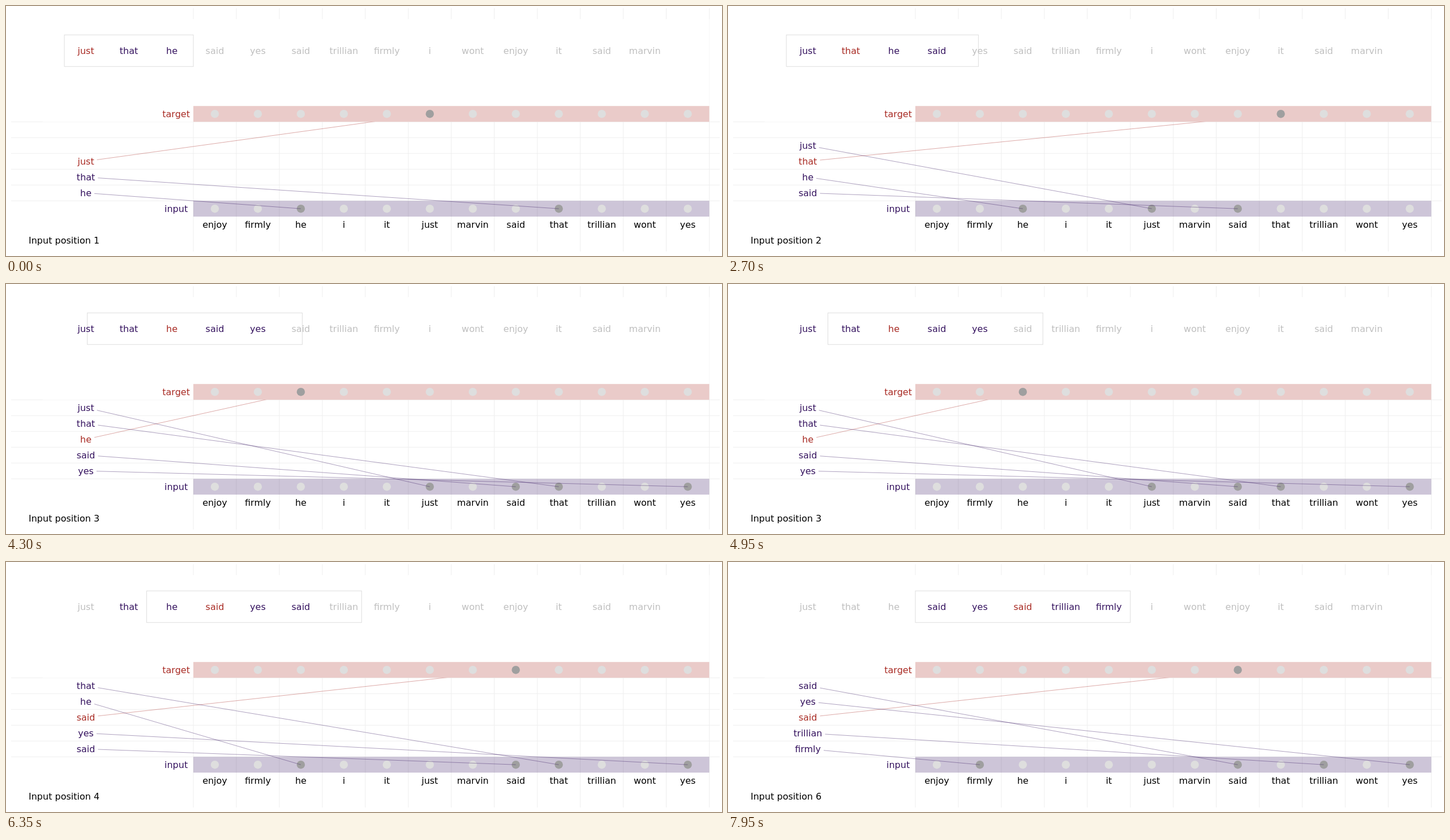
These frames come from a looping animation (1265 by 443 pixels, 8000 ms). An HTML page with a canvas:

```html
<!DOCTYPE html>
<html lang="en">
<head>
<meta charset="utf-8">
<title>Sliding context window</title>
<style>
  html, body { margin: 0; width: 100%; height: 100%; overflow: hidden; background: #fff; }
  canvas { display: block; }
</style>
</head>
<body>
<canvas id="stage" width="1265" height="443"></canvas>
<script>
const ctx = document.getElementById('stage').getContext('2d');
const LOOP = 8000, STEP = 1500, TICK = 50;
const STARTS = [500, 2000, 3500, 4980, 6450, 7950];

const words = 'just that he said yes said trillian firmly i wont enjoy it said marvin'.split(' ');
const vocab = [...new Set(words)].sort();

const RED = '#a82a23', PURPLE = '#34125e', GREY = '#bfbfbf', GRID = '#eee';
const DOTS = ['#dedede', '#9f9f9f', '#000'];

const COL = 75.96, ROW = 28, X0 = 331, Y0 = 51.2;
const LABEL_X = X0 - 2.5 * COL;
const RIGHT = X0 + vocab.length * COL;
const colX = i => X0 + (i + 0.5) * COL;
const wordX = i => LABEL_X + i * COL;
const midY = r => Y0 + r * ROW;
const bottomY = r => midY(r + 0.5);
const TARGET = 5, CENTRE = 8, INPUT = 11;

function text(str, x, y, color, align = 'center') {
  ctx.fillStyle = color;
  ctx.textAlign = align;
  ctx.fillText(str, x, y + 5.6);
}

function line(x1, y1, x2, y2, color, alpha = 1) {
  ctx.globalAlpha = alpha;
  ctx.strokeStyle = color;
  ctx.beginPath();
  ctx.moveTo(x1, y1);
  ctx.lineTo(x2, y2);
  ctx.stroke();
  ctx.globalAlpha = 1;
}

function band(row, color) {
  ctx.globalAlpha = 0.245;
  ctx.fillStyle = color;
  ctx.fillRect(X0, bottomY(row - 1), RIGHT - X0, ROW);
  ctx.globalAlpha = 1;
}

function dots(row, active) {
  vocab.forEach((word, i) => {
    ctx.fillStyle = DOTS[active.filter(w => w === word).length];
    ctx.beginPath();
    ctx.arc(colX(i), midY(row), 7.2, 0, 2 * Math.PI);
    ctx.fill();
  });
}

// Connects a label to its vocabulary column, leaving room for the label text.
function link(word, row, endRow, color) {
  const y = midY(row), endX = colX(vocab.indexOf(word)), endY = midY(endRow);
  const gap = ctx.measureText(word).width / 2 + 5;
  const startY = y + (endY - y) * gap / (endX - LABEL_X);
  line(LABEL_X + gap, startY, endX, endY, color, 0.4);
}

function grid() {
  for (let i = 0; i <= vocab.length; i++) line(X0 + i * COL, 4, X0 + i * COL, 435, GRID);
  for (let r = TARGET; r < INPUT; r++) line(9, bottomY(r), 1261, bottomY(r), GRID);
}

// Fractional window position: the whole part is the current input position.
function progress(t) {
  if (t < STARTS[0]) return 1;
  const k = STARTS.filter(s => s <= t).length;
  return k + Math.min((t - STARTS[k - 1]) / STEP, 0.999);
}

function draw(t) {
  const p = progress(t), position = Math.floor(p), target = position - 1;
  const inWindow = i => Math.abs(i - target) <= 2;
  const color = i => i === target ? RED : inWindow(i) ? PURPLE : GREY;
  const shown = words.map((word, i) => ({ word, i, row: CENTRE + i - target }))
                     .filter(d => inWindow(d.i));
  const inputs = shown.filter(d => d.i !== target);

  ctx.fillStyle = '#fff';
  ctx.fillRect(0, 0, 1265, 443);
  ctx.font = '16px "DejaVu Sans", sans-serif';
  ctx.lineWidth = 1;

  grid();
  link(words[target], CENTRE, TARGET, RED);
  ctx.fillStyle = '#fff';
  ctx.fillRect(65, midY(-1), RIGHT - 65, bottomY(TARGET) - midY(-1));

  band(TARGET, RED);
  band(INPUT, PURPLE);
  dots(TARGET, [words[target]]);
  dots(INPUT, inputs.map(d => d.word));
  inputs.forEach(d => link(d.word, d.row, INPUT, PURPLE));

  const left = X0 + (Math.max(p, 3) - 6) * COL;
  ctx.strokeStyle = '#ddd';
  ctx.strokeRect(left, midY(0), X0 + (p - 1) * COL - left, 2 * ROW);

  words.forEach((word, i) => text(word, wordX(i), midY(1), color(i)));
  shown.forEach(d => text(d.word, LABEL_X, midY(d.row), color(d.i)));
  text('target', 300.6, midY(TARGET), RED);
  text('input', 300.6, midY(INPUT), PURPLE);
  vocab.forEach((word, i) => text(word, colX(i), midY(INPUT + 1), '#000'));
  text('Input position ' + position, 40, midY(INPUT + 2), '#000', 'left');
}

function frame(now) {
  const t = now % LOOP;
  draw(t - t % TICK);
  requestAnimationFrame(frame);
}
draw(0);
requestAnimationFrame(frame);
</script>
</body>
</html>
```
